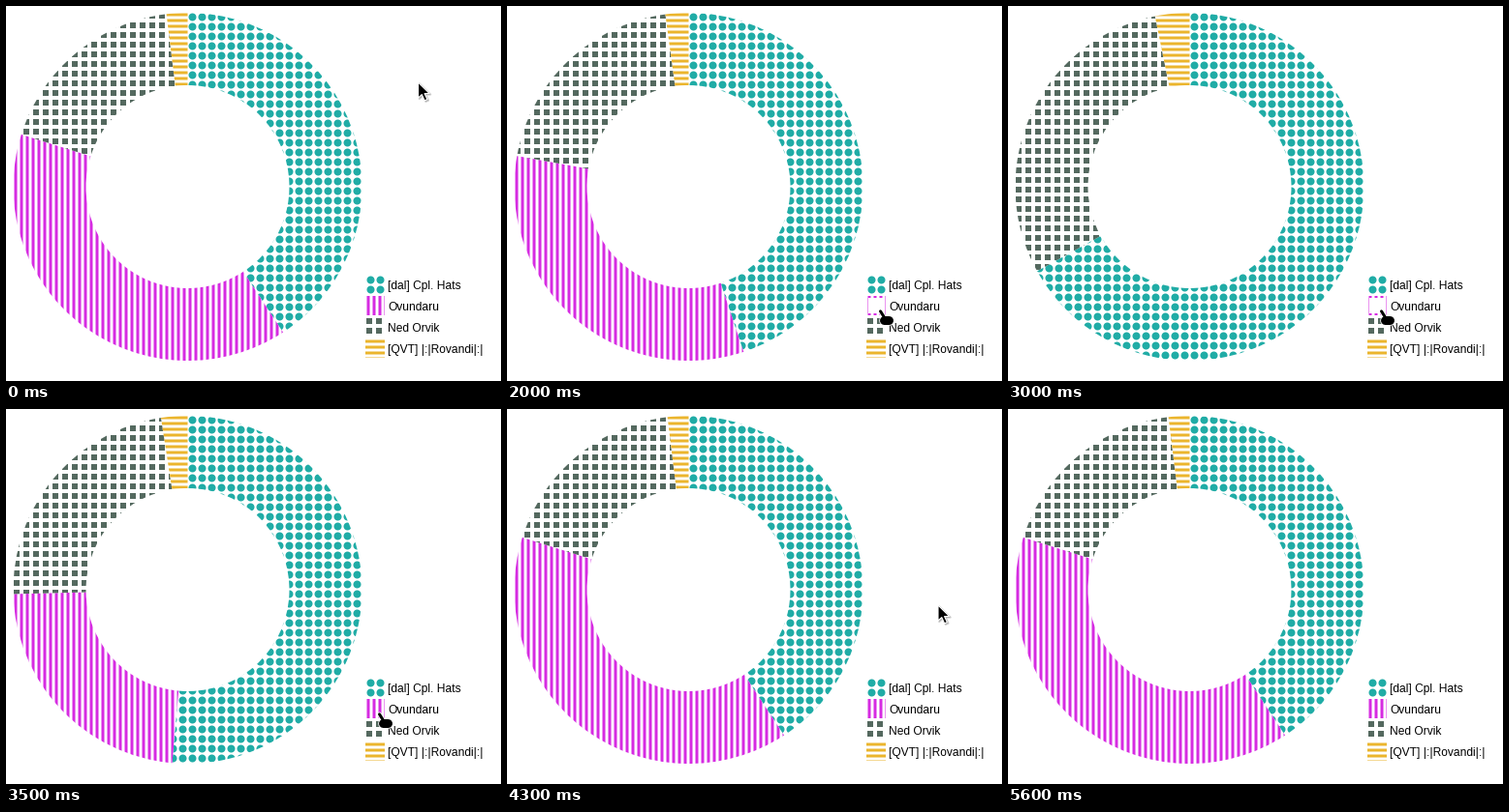
A matplotlib script for the animation above (5700 ms loop, 511 by 388 pixels).

```python
import numpy as np
import matplotlib.pyplot as plt
from matplotlib.animation import FuncAnimation
from matplotlib.lines import Line2D
from matplotlib.patches import PathPatch, Polygon, Rectangle, Wedge
from matplotlib.path import Path
from matplotlib.transforms import Affine2D

W, H, DPI = 511, 388, 100
PT = 72 / DPI
FRAMES, STEP = 57, 100
CENTER, OUTER, RING = (187.5, 187), 180, 75
TEXTURE_ORIGIN = (188, 187)
BOX, ROW = 18, 22
LEGEND_X, LEGEND_Y = 372, 279
HIDE_AT, SHOW_AT, TWEEN = 1745, 3100, 750
CURSOR_GONE = 4600

SHARES = np.array([0.4078, 0.3908, 0.182, 0.0194])
REDUCED = SHARES * [1, 0, 1, 1]
START, ENTRY, ITEM, EXIT = (425.5, 79), (398, 276), (387, 315), (445, 203)


def rect(x, y, w, h):
    return Path([(x, y), (x + w, y), (x + w, y + h), (x, y + h), (x, y)],
                closed=True)


def steps(size, lo, hi):
    return range(lo // size * size, hi, size)


def dots(x, y, lo, hi):
    return [Path.circle((x + i + 4.5, y + j + 4.5), 4)
            for i in steps(10, lo, hi) for j in steps(10, lo, hi)]


def columns(x, y, lo, hi):
    return [rect(x + i + 0.5, y + lo, 3, hi - lo) for i in steps(6, lo, hi)]


def squares(x, y, lo, hi):
    return [rect(x + i, y + j, 6, 6)
            for i in steps(10, lo, hi) for j in steps(10, lo, hi)]


def rows(x, y, lo, hi):
    return [rect(x + lo, y + j + 0.5, hi - lo, 3) for j in steps(6, lo, hi)]


SERIES = [
    ("[dal] Cpl. Hats", dots, "#20aca6"),
    ("Ovundaru", columns, "#d62be2"),
    ("Ned Orvik", squares, "#54695f"),
    ("[QVT] |:|Rovandi|:|", rows, "#ebb52d"),
]

fig = plt.figure(figsize=(W / DPI, H / DPI), dpi=DPI, facecolor="white")
ax = fig.add_axes([0, 0, 1, 1])
ax.set(xlim=(0, W), ylim=(H, 0))
ax.axis("off")


def textured(texture, color, x, y, lo, hi):
    path = Path.make_compound_path(*texture(x, y, lo, hi))
    return ax.add_patch(PathPatch(path, fc=color, lw=0, snap=False))


slices = []
for k, (label, texture, color) in enumerate(SERIES):
    slices.append(textured(texture, color, *TEXTURE_ORIGIN, -OUTER - 1, OUTER))
    y = LEGEND_Y + k * ROW
    swatch = textured(texture, color, LEGEND_X, y, -1, BOX + 1)
    swatch.set_clip_path(Rectangle((LEGEND_X - 1, y - 1), BOX + 2, BOX + 2,
                                   transform=ax.transData))
    ax.text(LEGEND_X + 22, y + 14, label, family="Liberation Sans",
            size=12 * PT, color="black", va="baseline")

# Empties the second swatch down to its outline
blank = ax.add_patch(Rectangle((LEGEND_X + 1, LEGEND_Y + ROW + 1), BOX - 2,
                               BOX - 2, fc="white", lw=0, zorder=2))

# Both cursors are drawn with the hot spot at (0, 0) and moved together
mover = Affine2D()
on_stage = mover + ax.transData


def arrow_shape(shift=0, **style):
    outline = np.array([(0, 0), (0, 16), (3.8, 12.6), (6.6, 18.8),
                        (9.4, 17.6), (6.6, 11.6), (11.6, 11.4)])
    return ax.add_patch(Polygon(outline + shift, fc="black", snap=False,
                                joinstyle="round", transform=on_stage, **style))


def stroke(start, end, width, color, zorder):
    return ax.add_line(Line2D(*zip(start, end), lw=width * PT, color=color,
                              solid_capstyle="round", transform=on_stage,
                              zorder=zorder))


arrow = [arrow_shape(1.2, ec="black", lw=1.4, alpha=0.18, zorder=5),
         arrow_shape(ec="white", lw=0.8, zorder=6)]
hand = []
for zorder, (color, border) in enumerate([("white", 1.6), ("black", 0)], 5):
    hand += [stroke((-1.5, 0.8), (3, 8), 3 + border, color, zorder),
             stroke((2, 9.5), (6.5, 9.5), 9 + border, color, zorder)]


def ease(t):
    t = np.clip(t, 0, 1)
    return 4 * t**3 if t < 0.5 else 1 - 4 * (1 - t)**3


def cursor_at(now):
    times = [400, 1100, 1700, 3500, 4300]
    stops = np.array([START, ENTRY, ITEM, ITEM, EXIT])
    return [np.interp(now, times, axis) for axis in stops.T]


def draw(frame):
    now = frame * STEP
    hidden = ease((now - HIDE_AT) / TWEEN) - ease((now - SHOW_AT) / TWEEN)
    full, less = (np.r_[0, np.cumsum(s / s.sum())] * 360
                  for s in (SHARES, REDUCED))
    edges = full + (less - full) * hidden - 90
    for part, a, b in zip(slices, edges, edges[1:]):
        part.set_visible(b - a > 0.01)
        part.set_clip_path(Wedge(CENTER, OUTER, a, b, width=RING,
                                 transform=ax.transData))
    blank.set_visible(HIDE_AT <= now < SHOW_AT)

    x, y = cursor_at(now)
    mover.clear().translate(x, y)
    over = (LEGEND_X <= x <= LEGEND_X + BOX
            and LEGEND_Y <= y <= LEGEND_Y + 4 * ROW)
    for part in arrow:
        part.set_visible(now < CURSOR_GONE and not over)
    for part in hand:
        part.set_visible(now < CURSOR_GONE and over)
    return [*slices, blank, *arrow, *hand]


anim = FuncAnimation(fig, draw, frames=FRAMES, interval=STEP, repeat=True,
                     repeat_delay=0, blit=False)
plt.show()
```
